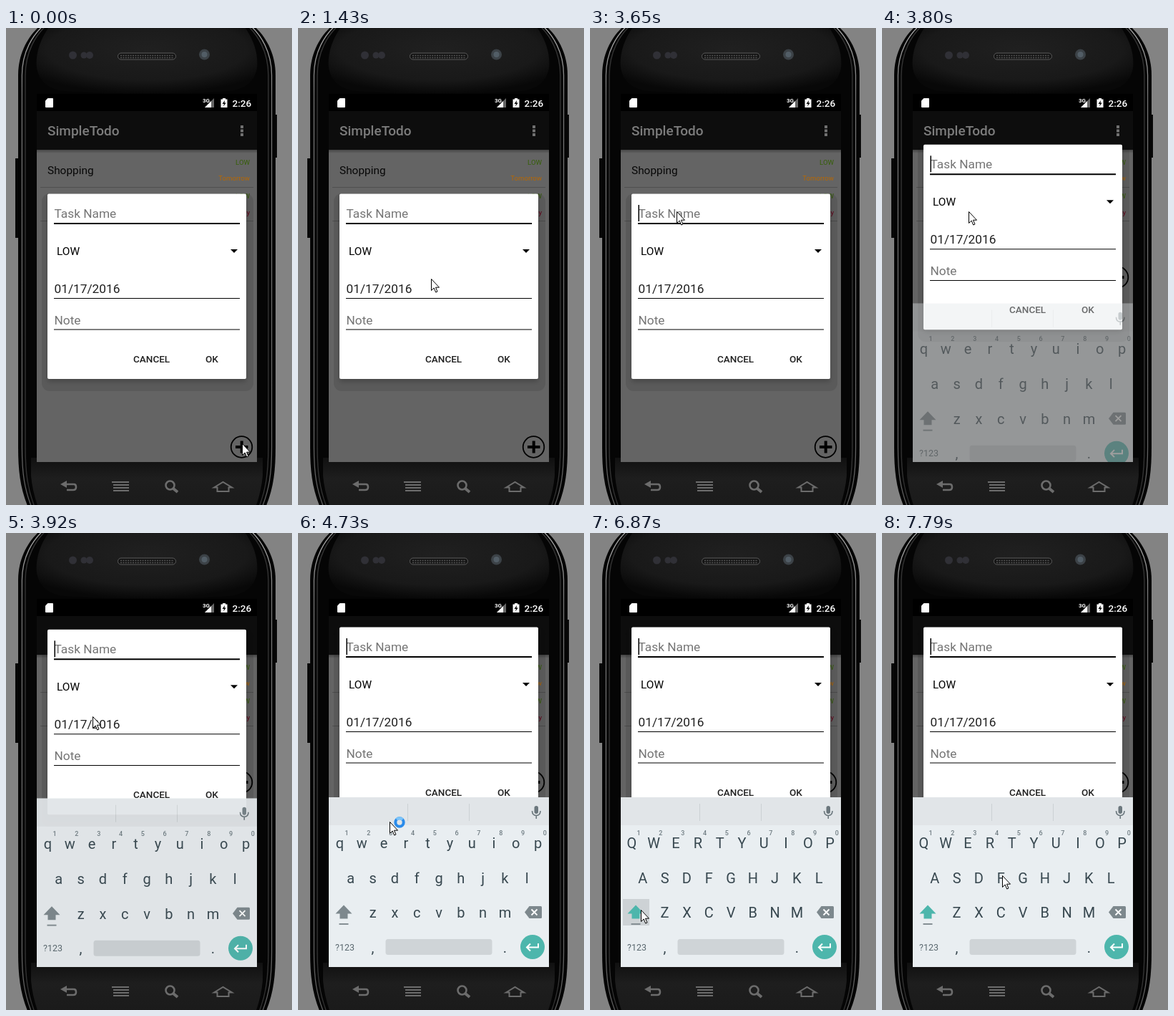
Animation, 400 px wide and 666 px high, one loop 8000 ms. Source, as an HTML page:

```html
<!DOCTYPE html>
<html lang="en">
<head>
<meta charset="utf-8">
<title>Add task</title>
<style>
html, body { margin: 0; width: 100%; height: 100%; overflow: hidden; background: #838383; }
svg { display: block; width: 400px; height: 666px; font-family: Roboto, sans-serif; }
.medium { font-weight: 500; }
.mid { text-anchor: middle; }
.end { text-anchor: end; }
.key { font-size: 20px; fill: #37474f; text-anchor: middle; }
.hint { font-size: 9px; font-weight: 500; fill: #6f7c82; text-anchor: middle; }
</style>
</head>
<body>
<svg viewBox="0 0 400 666">
  <defs>
    <radialGradient id="face" cx=".5" cy=".35" r=".65">
      <stop offset="0" stop-color="#202020"/><stop offset=".7" stop-color="#191919"/><stop offset="1" stop-color="#080808"/>
    </radialGradient>
    <linearGradient id="chin" x2="0" y2="1">
      <stop offset="0" stop-color="#101010"/><stop offset=".4" stop-color="#1e1e1e"/><stop offset="1" stop-color="#1a1a1a"/>
    </linearGradient>
    <linearGradient id="rim" x2="0" y2="1">
      <stop offset="0" stop-color="#b0b0b0"/><stop offset=".15" stop-color="#777"/><stop offset="1" stop-color="#606060"/>
    </linearGradient>
    <linearGradient id="drop" x2="0" y2="1">
      <stop offset="0" stop-opacity=".3"/><stop offset="1" stop-opacity="0"/>
    </linearGradient>
    <filter id="soft" x="-10%" y="-10%" width="120%" height="120%"><feGaussianBlur stdDeviation="3"/></filter>
    <path id="body" d="M51-6C32 9 17 34 17 66V585C17 620 20 645 33 674H361C374 645 377 620 377 585V66C377 34 362 9 343-6Z"/>
    <clipPath id="screen"><rect x="43" y="92" width="308" height="514"/></clipPath>
  </defs>

  <!-- phone -->
  <rect width="400" height="666" fill="#838383"/>
  <path d="M13 182h5v111h-5zM376 121h3v60h-3z" fill="#080808"/>
  <use href="#body" fill="#050505"/>
  <g fill="none">
    <use href="#body" stroke="url(#rim)" stroke-width="1.3" transform="translate(5.9) scale(.97 1)"/>
    <use href="#body" stroke="#333" stroke-width="1.5" transform="translate(11) scale(.944 1)"/>
  </g>
  <path d="M62-4H332Q354 26 351 56Q346 84 312 88Q197 95 82 88Q48 84 43 56Q40 26 62-4Z" fill="url(#face)"/>
  <path d="M35 600H359V625Q357 648 348 672H46Q37 648 35 625Z" fill="url(#chin)"/>
  <rect x="156.500" y="35" width="81" height="9" rx="4.500" fill="#141414" stroke="#5c5c5c"/>
  <path d="M160 38.500H235M160 41.500H235" stroke="#555" stroke-width="1.400" stroke-dasharray="2 1.4"/>
  <g fill="#303036">
    <circle cx="93.500" cy="38" r="5.500"/><circle cx="109" cy="38" r="4.500"/><circle cx="117" cy="38" r="5"/>
  </g>
  <circle cx="277.500" cy="37" r="7.500" fill="#3c4247"/><circle cx="277.500" cy="37" r="4" fill="#525d66"/>
  <g fill="none" stroke="#6c6c6c" stroke-width="2.600">
    <path d="M82 637H95Q98 637 98 641T94 645H85"/>
    <path d="M148 634H172M150 638H172M150 642H172M150 646H172" stroke-width="1.800"/>
    <circle cx="229.500" cy="638.500" r="6"/><path d="M234 643L240 648" stroke-width="4"/>
    <path d="M291 641.500L303.500 634 316 641.500H311.500V647H295.500V641.500Z" stroke-width="2"/>
  </g>
  <path d="M76 637L85 632V642Z" fill="#6c6c6c"/>

  <g clip-path="url(#screen)">
    <!-- dimmed list -->
    <rect x="43" y="92" width="308" height="514" fill="#646464"/>
    <rect x="43" y="92" width="308" height="24"/>
    <rect x="43" y="116" width="308" height="54" fill="#0d0d0d"/>
    <rect x="43" y="170" width="308" height="5" fill="url(#drop)"/>
    <text x="58" y="150" font-size="19" class="medium" fill="#7c7c7c">SimpleTodo</text>
    <path d="M328 136h4v4h-4zM328 141.500h4v4h-4zM328 147h4v4h-4z" fill="#707070"/>
    <text x="58" y="204" font-size="15.400" fill="#080808">Shopping</text>
    <g font-size="9.600" class="end">
      <text x="341" y="190.500" fill="#365f08">LOW</text><text x="341" y="213" fill="#b96800">Tomorrow</text>
      <text x="341" y="237.500" fill="#365f08">LOW</text><text x="341" y="260.500" fill="#66001a">Today</text>
    </g>
    <path d="M48 222.500H346M48 269.500H346" stroke="#505050"/>
    <g id="add">
      <circle cx="329.500" cy="585" r="14.800" fill="none" stroke="#000" stroke-width="1.800"/>
      <path d="M321 585H338.500M329.700 576.500V593.500" stroke="#000" stroke-width="4"/>
    </g>

    <!-- status icons -->
    <g fill="#fff">
      <path d="M58.500 98H65Q66 98 66 99V110Q66 111 65 111H56Q55 111 55 110V101.500Z"/>
      <path d="M291 98V111H278Z" fill="#666"/><path d="M287 102V111H278Z"/>
      <text x="275" y="103.500" font-size="8" font-weight="700">3G</text>
      <path d="M303 98H307V99.500H309.500V111H300.500V99.500H303Z"/>
      <path d="M306 101L302.500 106H305L304 109.500 307.800 104.500H305.500Z" fill="#000"/>
      <text x="316.500" y="109.500" font-size="13.500" class="medium">2:26</text>
    </g>

    <!-- dialog -->
    <g id="dialog">
      <rect x="50" y="231" width="296" height="276" rx="11" fill-opacity=".1"/>
      <rect x="58" y="236" width="278" height="258" rx="4" fill-opacity=".2" filter="url(#soft)"/>
      <rect x="58" y="231.500" width="278" height="258.500" rx="2" fill="#fff"/>
      <g font-size="17.300" fill="#757575">
        <text x="67.500" y="265">Task Name</text><text x="67.500" y="414">Note</text>
        <text x="67.500" y="370" fill="#212121">01/17/2016</text>
      </g>
      <text x="71" y="317" font-size="15.400">LOW</text>
      <path d="M314 309H324L319 314Z"/>
      <path d="M67 272H327V274H67ZM67 377H327V378H67ZM67 420.600H327V421.600H67Z"/>
      <g font-size="13.500" class="medium" fill="#212121">
        <text x="178" y="467">CANCEL</text><text x="279" y="467">OK</text>
      </g>
      <rect id="caret" x="67.500" y="247" width="1.500" height="23"/>
    </g>

    <!-- keyboard -->
    <g id="keyboard">
      <rect x="43" y="369" width="308" height="260" fill="#e9eef1"/>
      <rect x="43" y="369" width="308" height="39" fill="#e1e5e8"/>
      <path d="M153.500 378V402M239.500 378V402" stroke="#cbd0d3"/>
      <rect x="330.500" y="381" width="5.500" height="11" rx="2.750" fill="#6b777d"/>
      <path d="M327.500 388Q327.500 394.500 333.250 394.500T339 388M333.250 394.500V399" fill="none" stroke="#6b777d" stroke-width="1.600"/>
      <rect id="press" x="46" y="511" width="37" height="37" fill="#cdd2d5"/>
      <g id="keys"></g>
      <path id="shift" d="M64 519.500L75.500 531.500H69.500V538.500H58.500V531.500H52.500Z"/>
      <path d="M57.500 546H70.500" stroke="#858f94" stroke-width="2"/>
      <path d="M317 529.500L323.500 521H339.500Q341 521 341 522.500V536.500Q341 538 339.500 538H323.500Z" fill="#7d888d"/>
      <path d="M326.500 525.500L334.500 533.500M334.500 525.500L326.500 533.500" stroke="#fff" stroke-width="1.800"/>
      <text x="65.500" y="582.500" font-size="12.500" fill="#59676e" class="mid">?123</text>
      <rect x="122.500" y="567" width="149" height="22" rx="3.500" fill="#cfd4d7"/>
      <circle cx="328" cy="578" r="17" fill="#4db6ac"/>
      <path d="M336 573V578.500H320.500M325 573.500L320 578.500 325 583.500" fill="none" stroke="#fff" stroke-width="2"/>
    </g>
  </g>

  <g id="cursor">
    <path d="M.5 .5V16.500L4.200 13 6.700 19 9 18 6.500 12.200H11.500Z" fill="#fff" stroke="#000"/>
    <g id="busy" fill="none" stroke-width="4">
      <circle cx="14" cy="1" r="5.700" stroke="#2b8ceb"/>
      <circle id="glint" cx="14" cy="1" r="5.700" stroke="#7cc4f8" stroke-dasharray="9 27"/>
    </g>
  </g>
</svg>
<script>
const LOOP = 8000;
const el = id => document.getElementById(id);
const show = (id, on) => el(id).setAttribute('display', on ? 'inline' : 'none');
const move = (id, x, y) => el(id).setAttribute('transform', `translate(${x} ${y})`);

function addText(x, y, label, cls) {
  const node = document.createElementNS('http://www.w3.org/2000/svg', 'text');
  node.setAttribute('x', x);
  node.setAttribute('y', y);
  node.setAttribute('class', cls);
  node.textContent = label;
  el('keys').append(node);
  return node;
}

const PITCH = 30.8;
const letters = [];
[['qwertyuiop', 58.4, 439.5], ['asdfghjkl', 73.8, 488.5], ['zxcvbnm', 104.6, 537]].forEach(([row, x0, y], r) => {
  [...row].forEach((c, i) => {
    const x = x0 + i * PITCH;
    letters.push(addText(x, y, c, 'key'));
    if (!r) addText(x + 9.7, 421.5, (i + 1) % 10, 'hint');
  });
});
addText(104.5, 585.5, ',', 'key');
addText(289.5, 585.5, '.', 'key');

// Screen refreshes: first, last, count
const bursts = [
  [0, 0, 1], [560, 560, 1], [1120, 2150, 8], [2300, 2300, 1], [2580, 3190, 5], [3650, 4040, 4],
  [4340, 5360, 9], [5510, 6440, 7], [6590, 6590, 1], [6870, 7380, 5], [7660, 7790, 2]
];
const caretToggles = [560, 1120, 1560, 2150, 2580, 3190, 3650, 4340, 4720, 5230, 5660, 6120, 6590, 7120, 7660];
// Pointer path: time, x, y
const pointer = [
  [0, 330, 580], [970, 330, 580], [1414, 186, 350], [1708, 160, 290], [2150, 154, 256], [2300, 154, 255],
  [2427, 154, 255], [2732, 146, 277], [3190, 121, 256], [4212, 121, 256], [4850, 130, 440], [5105, 128, 470],
  [5360, 115, 458], [5510, 108, 456], [5665, 108, 456], [6440, 71, 527], [6590, 71, 526], [6998, 71, 526],
  [7380, 181, 480], [7660, 175, 479], [7790, 168, 478], [LOOP, 168, 478]
];

function lastRefresh(t) {
  const [first, last, count] = bursts.findLast(b => b[0] <= t);
  if (count === 1) return first;
  const step = (last - first) / (count - 1);
  return Math.min(last, first + Math.floor((t - first) / step + 1e-6) * step);
}

function pointerAt(t) {
  const i = pointer.findIndex(p => p[0] > t);
  const [t0, x0, y0] = pointer[i - 1], [t1, x1, y1] = pointer[i];
  const k = (t - t0) / (t1 - t0);
  return [Math.round(x0 + (x1 - x0) * k), Math.round(y0 + (y1 - y0) * k)];
}

let wasCaps;
function draw(now) {
  const time = now % LOOP;
  const t = lastRefresh(time);
  const u = Math.min(1, Math.max(0, (t - 3650) / 350));
  const rise = 1 - (1 - u) ** 2.5;
  const caps = t >= 6870;

  move('dialog', 0, -100 * rise);
  move('add', 0, rise ? -237 : 0);
  move('keyboard', 0, 50 * (1 - rise));
  el('keyboard').setAttribute('opacity', 1 - 2 * (1 - rise));
  show('keyboard', rise > 0);
  show('caret', caretToggles.filter(c => c <= time).length % 2);

  show('press', caps && t < 6990);
  el('shift').setAttribute('fill', caps ? '#4db6ac' : '#7d888d');
  if (caps !== wasCaps) {
    for (const key of letters) key.textContent = caps ? key.textContent.toUpperCase() : key.textContent.toLowerCase();
    wasCaps = caps;
  }

  move('cursor', ...pointerAt(t));
  show('busy', t >= 4720 && t < 5650);
  el('glint').setAttribute('transform', `rotate(${(t - 5510) * 0.4 + 180} 14 1)`);
  requestAnimationFrame(draw);
}
requestAnimationFrame(draw);
</script>
</body>
</html>
```
